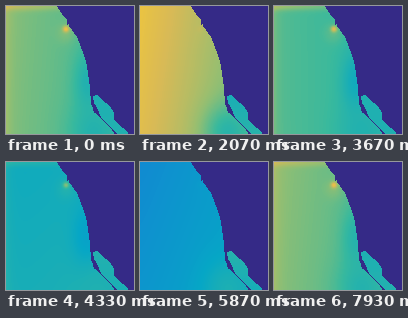
These frames come from a looping animation (128x128 px, 7990 ms). A matplotlib script:

```python
import numpy as np
import matplotlib.pyplot as plt
from matplotlib.animation import FuncAnimation
from matplotlib.colors import LinearSegmentedColormap
from matplotlib.path import Path

SIZE = 128
FRAMES = 120
LOOP_MS = 7990
TIDE, PULSE = 118, 58   # periods in frames
SHELTERED = .44         # steady height in the bay and around its mouth

PARULA = LinearSegmentedColormap.from_list("parula", [
    "#352a87", "#0363e1", "#1485d4", "#06a7c6", "#38b99e",
    "#92bf73", "#d9ba56", "#fcce2e", "#f9fb0e"], N=256)

OCEAN = [(-1, -1), (50, -1), (54, 5), (57, 10), (61, 13), (63, 20), (71, 31),
         (78, 49), (81, 60), (84, 82), (85, 98), (89, 106), (94, 112),
         (100, 118), (106, 124), (109, 129), (-1, 129)]
BAY = [(87, 90), (92, 89), (97, 95), (104, 100), (108, 107), (108, 113),
       (113, 119), (122, 126), (122, 129), (112, 129), (104, 120),
       (95, 111), (92, 104), (88, 97)]

X, Y = np.meshgrid(np.arange(SIZE) + .5, np.arange(SIZE) + .5)


def inside(points):
    cells = np.column_stack([X.ravel(), Y.ravel()])
    return Path(points).contains_points(cells).reshape(X.shape)


def blob(x, y, rx, ry):
    return np.exp(-((X - x) / rx) ** 2 - ((Y - y) / ry) ** 2)


bay = inside(BAY)
islets = (blob(61.5, 17, 1, 2) + blob(57, 8, 1, 1)
          + blob(89, 103, 2, 4)) > .4
sea = (inside(OCEAN) | bay) & ~islets

offshore = .5 - X / 85
top_edge = np.exp(-(Y / 4.5) ** 2) * np.clip(1.1 - X / 110, 0, 1)
left_edge = np.exp(-X / 5)
headland = blob(60, 23, 3, 3) + .2 * blob(60, 27, 9, 10)
coast = blob(81, 76, 14, 32)
mouth = .85 * blob(88, 126, 24, 28)


def field(frame):
    tide = np.cos(2 * np.pi * (frame - 25) / TIDE)
    pulse = .5 + .5 * np.cos(2 * np.pi * (frame - 55) / PULSE)

    water = .52 + .2 * tide + (.05 + .12 * tide) * offshore
    water -= .04 * tide * (Y / SIZE - .5)
    water += pulse * (.1 * pulse * top_edge + .05 * left_edge
                      + .23 * headland - .09 * coast)
    water += mouth * (SHELTERED - water)
    water = np.where(bay, SHELTERED + .02 * tide * (Y - 105) / 20, water)
    return np.where(sea, water, 0)


fig = plt.figure(figsize=(1.28, 1.28), dpi=100)
ax = fig.add_axes([0, 0, 1, 1])
ax.axis("off")
image = ax.imshow(field(0), cmap=PARULA, vmin=0, vmax=1,
                  interpolation="nearest", aspect="auto")


def update(frame):
    image.set_data(field(frame))
    return [image]


anim = FuncAnimation(fig, update, frames=FRAMES, interval=LOOP_MS / FRAMES,
                     repeat=True, repeat_delay=0, blit=False)
plt.show()
```
